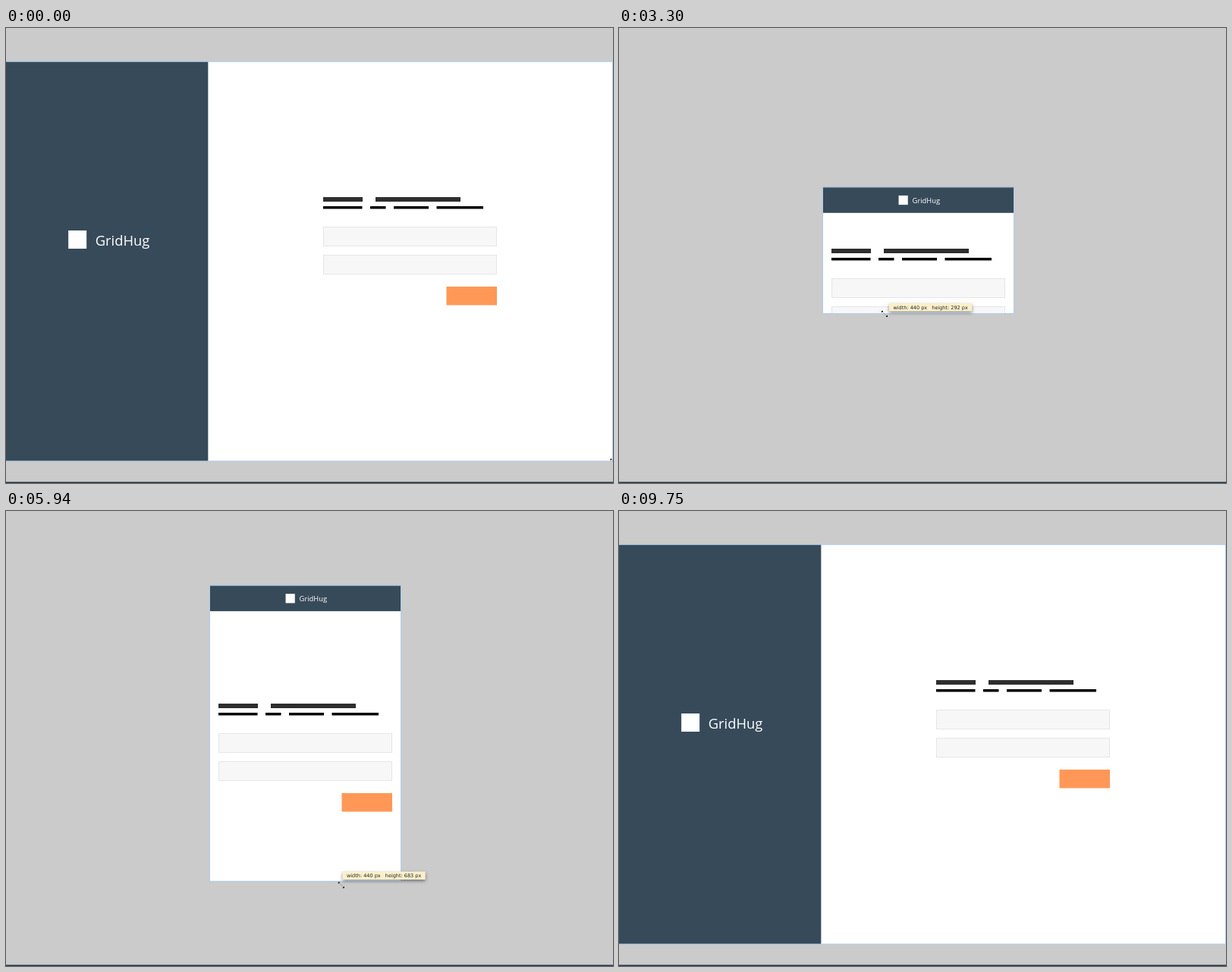
These frames come from a looping animation (800 px wide and 600 px high, 9.9 s). An HTML page with a canvas:

```html
<!DOCTYPE html>
<html lang="en">
<head>
<meta charset="utf-8">
<title>Responsive sign-in</title>
<style>
html, body { margin: 0; width: 100%; height: 100%; overflow: hidden; background: #cbcbcb; }
canvas { display: block; }
</style>
</head>
<body>
<canvas id="stage" width="800" height="600"></canvas>
<script>
const ctx = document.getElementById('stage').getContext('2d');
const LOOP = 9900, STEP = 30;
const SCALE = 0.5715;                     // stage pixels per page pixel
const MIN_W = 251.5, MAX_W = 799, MAX_H = 527;
const CENTER_X = 394.5, CENTER_Y = 293.5, MIN_TOP = 44;
const BREAKPOINT = 768 * SCALE;
const PAGE_LAG = 180, TIP_LAG = 150;      // both trail the pointer

const easeIn = n => u => u ** n;
const easeOut = n => u => 1 - (1 - u) ** n;

// The drag, leg by leg: start time, end time, end point, easing
const START = [800.5, 572];
const LEGS = [
  [390, 2490, [498, 377], easeIn(3.63)],
  [2490, 2580, [350, 377], easeIn(1)],
  [3870, 4920, [394, 453], easeOut(1.15)],
  [4920, 6570, [450, 500], easeOut(2)],
  [7120, 7380, [504, 507], easeOut(2)],
  [7380, 8010, [754, 602], easeIn(1)],
  [8010, 8880, [801, 612], easeOut(3)]
];

const clamp = (v, low, high) => Math.min(high, Math.max(low, v));

function pointerAt(t) {
  let [x, y] = START;
  for (const [from, to, end, ease] of LEGS) {
    const p = ease(clamp((t - from) / (to - from), 0, 1));
    x += (end[0] - x) * p;
    y += (end[1] - y) * p;
  }
  return [x, y];
}

// The page is centred, so its edges move both ways with the pointer.
function pageSize(t) {
  const [x, y] = pointerAt(t - PAGE_LAG);
  return [clamp(2 * (x - CENTER_X), MIN_W, MAX_W), Math.min(2 * (y - CENTER_Y), MAX_H)];
}

function rect(x, y, w, h, color) {
  ctx.fillStyle = color;
  ctx.fillRect(x, y, w, h);
}

function drawLogo(cx, cy, width) {
  ctx.save();
  ctx.translate(cx, cy);
  ctx.scale(width / 114, width / 114);
  rect(-51, -12, 24, 24, '#fff');
  ctx.font = '18.4px "Open Sans", "Noto Sans", sans-serif';
  ctx.fillText('GridHug', -15.5, 8);
  ctx.restore();
}

function drawForm(x, y) {
  ctx.save();
  ctx.translate(x, y);
  rect(0, 0, 52, 6, '#2f2e2f');
  rect(69, 0, 112, 6, '#2f2e2f');
  for (const [left, w] of [[0, 51.5], [62, 20.5], [93, 46], [149.5, 61.5]])
    rect(left, 12, w, 3.5, '#000');
  for (const top of [39, 76]) {
    rect(0, top, 229, 26, '#e6e6e6');
    rect(1, top + 1, 227, 24, '#f7f7f7');
  }
  rect(162.5, 118, 66.5, 24.5, '#ff9857');
  ctx.restore();
}

function drawPage(w, h) {
  const x = Math.max(0, CENTER_X - w / 2);
  const y = Math.max(MIN_TOP, CENTER_Y - .5 - h / 2);
  const wide = w > BREAKPOINT;
  const side = wide ? w / 3 : 0, head = wide ? 0 : 34.3;

  ctx.save();
  ctx.beginPath();
  ctx.rect(x, y, w, h);
  ctx.clip();
  rect(x, y, w, h, '#fff');
  rect(x, y, side || w, head || h, '#374a5a');
  if (wide) drawLogo(x + side / 2, y + h / 2 - 28.5, Math.min(114, side - 91));
  else drawLogo(x + w / 2, y + 17.5, 58);
  drawForm(Math.round(x + (w + side) / 2 - 114.7),
           Math.round(y + head + (h - head) / 3 + 3.2));
  ctx.restore();

  ctx.strokeStyle = 'rgba(165,203,245,.8)';
  ctx.lineWidth = 1;
  ctx.strokeRect(x - .5, y + .5, w + 1, h - .5);
}

function drawTip(x, y, w, h) {
  const px = n => Math.round(n / SCALE) + ' px';
  const text = `width: ${px(w)}   height: ${px(h)}`;
  ctx.font = '6.5px "DejaVu Sans", sans-serif';
  ctx.save();
  ctx.shadowColor = 'rgba(0,0,0,.45)';
  ctx.shadowBlur = 4;
  ctx.shadowOffsetY = 2;
  rect(x, y, ctx.measureText(text).width + 11, 10.5, '#fbf0cb');
  ctx.restore();
  ctx.fillStyle = '#222';
  ctx.fillText(text, x + 5.5, y + 7.7);
}

function drawPointer(x, y) {
  ctx.save();
  ctx.translate(x, y);
  ctx.strokeStyle = 'rgba(0,0,0,.35)';
  ctx.lineWidth = .7;
  ctx.beginPath();
  ctx.moveTo(-3, -3);
  ctx.lineTo(3, 3);
  ctx.stroke();
  ctx.fillStyle = '#000';
  for (const s of [-1, 1]) {
    ctx.beginPath();
    ctx.moveTo(4 * s, 4 * s);
    ctx.lineTo(4 * s, 1.5 * s);
    ctx.lineTo(1.5 * s, 4 * s);
    ctx.fill();
  }
  ctx.restore();
}

function frame(now) {
  const t = Math.floor(now % LOOP / STEP) * STEP;
  const [w, h] = pageSize(t);
  const [tipX, tipY] = pointerAt(t - TIP_LAG);
  rect(0, 0, 800, 600, '#cbcbcb');
  drawPage(w, h);
  drawTip(tipX + 6, tipY - 14, w, h);
  drawPointer(...pointerAt(t));
  rect(0, 598.5, 800, 1.5, '#263645');
  requestAnimationFrame(frame);
}
requestAnimationFrame(frame);
</script>
</body>
</html>
```
